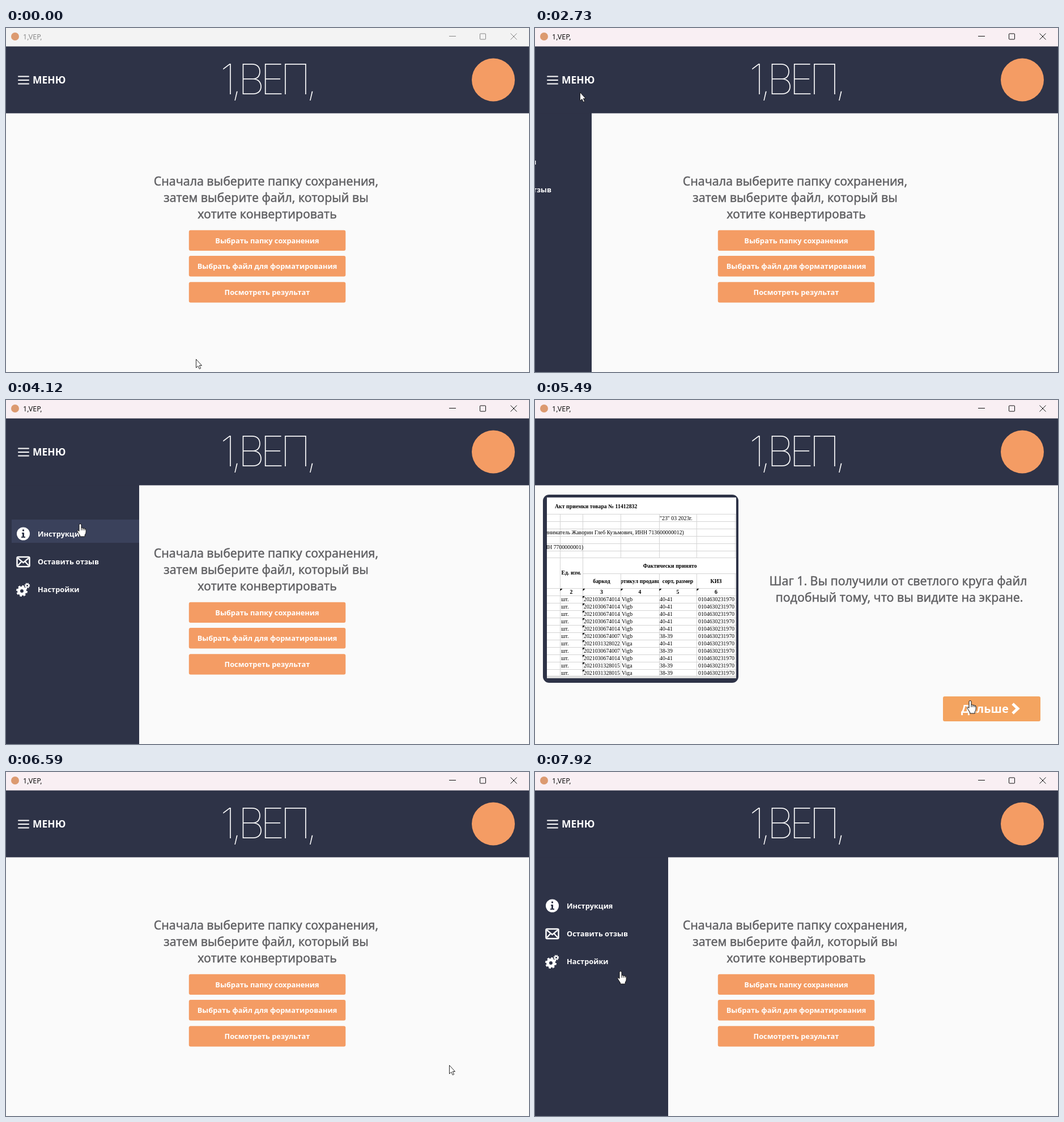
These frames come from a looping animation (923x607 px, 7.99 s). An HTML page:

```html
<!DOCTYPE html>
<html lang="ru">
<head>
<meta charset="utf-8">
<style>
  html, body { margin: 0; width: 100%; height: 100%; overflow: hidden; background: #fafafa; }
  body > svg { display: block; width: 100vw; height: 100vh; font-family: "Noto Sans", "Open Sans", sans-serif; }
  .bold { font-size: 12.8px; font-weight: 700; fill: #fff; }
  /* The thin outline gives a medium weight. */
  .lead { font-size: 21.25px; fill: #606063; stroke: #606063; stroke-width: .45px; }
  .mid { text-anchor: middle; }
  .button { fill: #f49c64; }
  .button.hover { fill: #f4a460; }
  .row { fill: none; }
  .row.hover { fill: #3a415b; }
  .sheet { font: 9.85px "Liberation Serif", serif; fill: #000; }
  .sheet .head { font-weight: 700; }
  #brand { font: 100 74px Inter, sans-serif; letter-spacing: -8px; fill: #fff; }
</style>
</head>
<body>
<svg viewBox="0 0 923 607">
  <rect width="923" height="607" fill="#fafafa"/>
  <g id="home">
    <g class="lead mid">
      <text x="459" y="278">Сначала выберите папку сохранения,</text>
      <text x="459" y="307">затем выберите файл, который вы</text>
      <text x="461" y="336">хотите конвертировать</text>
    </g>
    <g id="actions"></g>
  </g>

  <g id="guide">
    <rect x="14" y="167" width="345" height="332" rx="11" fill="#2e3347"/>
    <svg class="sheet" id="sheet" x="21" y="172" width="334" height="319" viewBox="21 172 334 319"></svg>
    <g class="lead mid">
      <text x="641" y="327">Шаг 1. Вы получили от светлого круга файл</text>
      <text x="643" y="356">подобный тому, что вы видите на экране.</text>
    </g>
    <rect id="next" class="button" x="720" y="523" width="172" height="44" rx="3"/>
    <text x="752" y="552" font-size="20" font-weight="600" fill="#fff">Дальше</text>
    <path d="M843 536l9 8.5-9 8.5" fill="none" stroke="#fff" stroke-width="5"/>
  </g>

  <g id="drawer">
    <rect y="149" width="235" height="458" fill="#2e3347"/>
    <g id="rows"></g>
    <circle cx="30.5" cy="236" r="11.5" fill="#fff"/>
    <path d="M28 234h4v7h2v2h-7v-2h2v-5h-1zM29 228.5h3v3h-3z" fill="#2e3347"/>
    <rect x="19.5" y="277" width="22" height="17" rx="2" fill="none" stroke="#fff" stroke-width="2.5"/>
    <path d="M21 279l9.5 8 9.500-8M21 292l6.500-7M40 292l-6.500-7" fill="none" stroke="#fff" stroke-width="2.3"/>
    <g fill="none" stroke="#fff">
      <circle cx="28" cy="337" r="5.5" stroke-width="5"/>
      <circle cx="28" cy="337" r="8.5" stroke-width="3" stroke-dasharray="3.6 3.076"/>
      <circle cx="37.5" cy="327.5" r="2.5" stroke-width="2"/>
      <circle cx="37.5" cy="327.5" r="4" stroke-width="1.5" stroke-dasharray="1.8 1.342"/>
    </g>
  </g>

  <rect y="32" width="923" height="118.5" fill="#2e3347"/>
  <g id="menu">
    <path d="M22 85.500h18M22 92h18M22 98.500h18" stroke="#fff" stroke-width="2" stroke-linecap="round"/>
    <text x="47" y="98" font-size="17.5" font-weight="700" fill="#fff">МЕНЮ</text>
  </g>
  <text id="brand" x="378" y="117">1,ВЕП,</text>
  <circle cx="860" cy="91.5" r="38" fill="#f49c64"/>

  <rect id="titlebar" width="923" height="32.5"/>
  <circle cx="16" cy="15" r="7" fill="#dc9a70"/>
  <text id="title" x="30" y="20" font-size="12.5">1,VEP,</text>
  <path id="controls" d="M782 14.500h12M890.500 9.500l11 11M901.500 9.500l-11 11M837.500 10h8q1 0 1 1v8q0 1-1 1h-8q-1 0-1-1v-8q0-1 1-1z" fill="none"/>

  <g id="cursor" fill="#fff" stroke="#111" stroke-linejoin="round">
    <path id="arrow" d="M.5.5V15.500l3.400-3.100 2.400 5.200 2.300-1.100-2.300-5H10.500z" stroke-width=".9"/>
    <path id="hand" d="M-2 1.500a2 2 0 0 1 4 0V7q2-1 3 .6 2-.8 3 .7 2-.5 2.200 1.600V14q0 3-2 5v3H-.5v-2L-5 13q-.8-2 .8-2.300L-2 12.500zM2 7v4M5 7.600v3.400M8 8.300V11"/>
  </g>
</svg>
<script>
const LOOP = 7990;
const $ = id => document.getElementById(id);
const text = (x, y, s, cls = '') => `<text x="${x}" y="${y}" class="${cls}">${s}</text>`;
const line = d => `<path d="${d}" stroke="#d4d4d4" fill="none"/>`;

const actions = [
  [356.7, 'Выбрать папку сохранения'],
  [402, 'Выбрать файл для форматирования'],
  [448.2, 'Посмотреть результат']
];
$('actions').innerHTML = actions.map(([y, s]) =>
  `<rect class="button" x="322.8" y="${y}" width="276.5" height="36.4" rx="3"/>` + text(461, y + 23.2, s, 'bold mid')).join('');

$('rows').innerHTML = ['Инструкция', 'Оставить отзыв', 'Настройки'].map((s, i) =>
  `<rect class="row" x="10" y="${211 + 49 * i}" width="225" height="41"/>` + text(56, 241 + 49 * i, s, 'bold')).join('');

function buildSheet() {
  const columns = [44.5, 84.5, 151.5, 219.5, 285.5, 353.5];
  const centers = [64, 117.5, 185, 252, 319.5];
  const codes = { a: '2021030674014', b: '2021030674007', c: '2021031328022', d: '2021031328015' };
  let out = '<rect x="21" y="172" width="334" height="319" fill="#fff"/>';
  for (const y of [201.5, 214.5, 227.5, 240.5, 253.5, 266.5, 278.5, 332.5]) out += line(`M21 ${y}H355`);
  for (const x of columns) out += line(`M${x} 201V278M${x} ${x > 85 ? 306 : 278}V487`);
  out += line('M84 306.5H355');
  out += text(35, 191, 'Акт приемки товара № 11412832', 'head') + text(220, 212, '"23" 03 2023г.');
  out += text(18, 237, 'иниматель Жаворин Глеб Кузьмович, ИНН 713600000012)');
  out += text(16, 263, 'НН 7700000001)');
  out += text(64, 308, 'Ед. изм.', 'head mid') + text(238, 296, 'Фактически принято', 'head mid');
  ['', 'баркод', '', 'сорт, размер', 'КИЗ'].forEach((s, i) => {
    out += text(centers[i], 323, s, 'head mid') + text(centers[i], 342, i + 2, 'head mid');
    out += `<path d="M${columns[i]} 333h4l-4 4z"/>`;
  });
  out += `<svg x="152" y="308" width="67" height="22">${text(33, 15, 'Артикул продавца', 'head mid')}</svg>`;
  [...'aaaaabcbadd'].forEach((key, i) => {
    const y = 355 + 13 * i;
    out += line(`M21 ${y - 9.5}H355`) + `<path d="M84 ${y - 9}h4l-4 4z"/>`;
    out += text(46, y, 'шт.') + text(86, y, codes[key]) + text(153, y, 'cd'.includes(key) ? 'Viga' : 'Vigb');
    out += text(220, y, 'ac'.includes(key) ? '40-41' : '38-39') + text(288, y, '0104630231970');
  });
  $('sheet').innerHTML = out + '<rect x="21" y="486.5" width="334" height="5" fill="#dedede"/>';
}
buildSheet();

// Pointer keys: time, x, y
const path = [
  [0, 335, 584], [70, 330, 575], [350, 256, 470], [560, 262, 370], [700, 340, 340], [840, 425, 362], [980, 443, 366],
  [1190, 448, 395], [1400, 446, 425], [1610, 440, 462], [1750, 420, 450], [2100, 250, 270], [2380, 75, 92],
  [2520, 78, 95], [2730, 79, 113], [3360, 140, 310], [3640, 150, 352], [3850, 142, 270], [4060, 131, 219],
  [5000, 131, 219], [5350, 755, 527], [5490, 768, 531], [6300, 768, 531], [6590, 782, 517], [6660, 778, 510],
  [7080, 200, 150], [7220, 75, 85], [7360, 80, 92], [7500, 100, 165], [7780, 140, 300], [7920, 151, 352], [LOOP, 151, 352]
];
const clamp = v => Math.max(0, Math.min(1, v));

function pointerAt(t) {
  const i = path.findIndex(key => key[0] > t);
  const [t0, x0, y0] = path[i - 1], [t1, x1, y1] = path[i];
  const k = (t - t0) / (t1 - t0);
  return [x0 + (x1 - x0) * k, y0 + (y1 - y0) * k];
}

function recordedTime(t) {
  const start = [6590, 5000, 4380, 4120, 0].find(s => s <= t);
  return start + Math.floor((t - start) / 70) * 70;
}

function draw(now) {
  const t = recordedTime(now % LOOP);
  const guide = t >= 4450 && t < 6520;
  const active = t >= 2450;
  const open = guide ? 0 : clamp((t - (t < 4450 ? 2590 : 7290)) / 330);
  const [x, y] = pointerAt(t);
  const inside = (l, top, w, h) => x >= l && x < l + w && y >= top && y < top + h;

  $('home').style.display = guide ? 'none' : '';
  $('menu').style.display = guide ? 'none' : '';
  $('guide').style.display = guide ? '' : 'none';
  $('drawer').setAttribute('transform', `translate(${Math.round(235 * (open - 1))})`);
  $('titlebar').setAttribute('fill', active ? '#f9eff3' : '#f3f3f3');
  $('title').setAttribute('fill', active ? '#111' : '#8b8b8b');
  $('controls').setAttribute('stroke', active ? '#111' : '#858585');

  let hand = !guide && (inside(21, 80, 84, 24) || open === 1 && inside(0, 205, 235, 165));
  const hover = (el, enabled) => {
    const on = enabled && inside(...['x', 'y', 'width', 'height'].map(name => +el.getAttribute(name)));
    el.classList.toggle('hover', on);
    hand ||= on;
  };
  document.querySelectorAll('#actions rect').forEach(el => hover(el, !guide));
  document.querySelectorAll('#rows rect').forEach(el => hover(el, open === 1));
  hover($('next'), guide);

  $('cursor').setAttribute('transform', `translate(${Math.round(x)} ${Math.round(y)})`);
  $('hand').style.display = hand ? '' : 'none';
  $('arrow').style.display = hand ? 'none' : '';
}

const begin = performance.now();
function tick() {
  draw(performance.now() - begin);
  requestAnimationFrame(tick);
}
tick();
</script>
</body>
</html>
```
